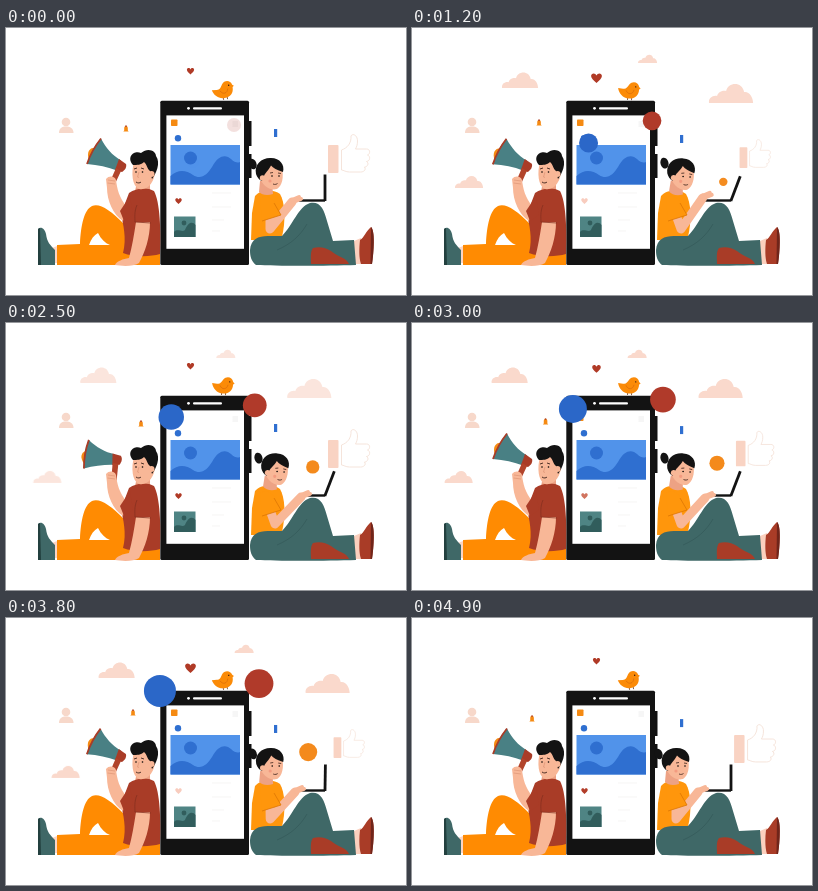
An HTML page for the animation above (5000 ms loop, 400 by 267 pixels).

```html
<!DOCTYPE html>
<html lang="en">
<head>
<meta charset="utf-8">
<title>Social phone</title>
<style>
html, body { margin: 0; width: 100%; height: 100%; overflow: hidden; background: #fff; }
svg { display: block; width: 100vw; height: 100vh; }
</style>
</head>
<body>
<svg viewBox="0 0 400 267" preserveAspectRatio="none">
  <defs>
    <path id="cloud" d="M0 20C-1 15 4 12 8 13C9 8 15 7 17 8C19-1 33-2 35 9C40 8 44 14 44 20Z"/>
    <path id="heartShape" d="M0 4.5C-3 2-5-.2-5-2C-5-5-1-5.2 0-2.5C1-5.2 5-5 5-2C5-.2 3 2 0 4.5Z"/>
  </defs>
  <rect width="400" height="267" fill="#fff"/>

  <g id="clouds" fill="#fad9cc"></g>

  <g fill="#f7d8ca">
    <circle cx="60" cy="94" r="4.3"/>
    <path d="M53 105C53 100 56 98.5 60 98.5S67.5 100 67.5 105Z"/>
  </g>
  <g id="bell" fill="#f58a12">
    <path d="M-1.8 1.5V-1C-1.8-3.8 1.8-3.8 1.8-1V1.5L2.7 2.6H-2.7Z"/>
    <circle cy="-2.8" r=".9" fill="#b5472a"/>
  </g>
  <rect id="chip" x="268" width="3.2" height="8" fill="#2f6fd0"/>
  <use id="heart" href="#heartShape" fill="#b03a26"/>

  <g id="thumb">
    <rect x="-21.5" y="-9" width="10.5" height="28" rx="1" fill="#f9d3c3"/>
    <path d="M-8-4C-2-6 2-11 1.5-18C3-21 8-19 8-13C8-9 7-7 6-5H17C21-5 21 0 18 1C21 2 21 7 17 7.5C20 9 18 13 15 13C17 16 14 18 11 18H0C-4 18-6 16-8 16Z" fill="#fff" stroke="#f3ddd2" stroke-width=".8"/>
  </g>

  <!-- phone -->
  <path d="M243 93h2.5v25H243zM243 126h2.5v24H243z" fill="#111"/>
  <rect x="154.3" y="72.7" width="88.7" height="164.3" rx="1.5" fill="#131313"/>
  <rect x="160.4" y="87.4" width="77.6" height="133.4" fill="#fff"/>
  <circle cx="182.5" cy="80.3" r="1.4" fill="#fff"/>
  <rect x="187" y="79.2" width="29" height="2.3" rx="1.1" fill="#fff"/>
  <rect x="165" y="91.5" width="6.5" height="6.5" rx=".8" fill="#f58a12"/>
  <path d="M226.5 94h5.5M226.5 96h5.5M226.5 98h5.5" stroke="#e6e6e6" stroke-width=".7"/>
  <circle cx="172" cy="110.3" r="3.2" fill="#2f6fd0"/>
  <rect x="164.5" y="117" width="69.5" height="39.5" fill="#5193ea"/>
  <circle cx="184.5" cy="130" r="6.5" fill="#2f6fd0"/>
  <path d="M164.5 148C172 141 180 142 187 147C195 152 201 147 206 139C212 127 220 126 225 131C229 135 232 135 234 134V156.5H164.5Z" fill="#2f6fd0"/>
  <use id="like" href="#heartShape" transform="translate(172.5 173) scale(.65)"/>
  <path d="M206 165h19M206 179h19M206 192h12M206 203h8" stroke="#f3f1f0" stroke-width=".7"/>
  <rect x="168" y="188.5" width="21.5" height="20.5" fill="#4f8484"/>
  <circle cx="178" cy="195" r="2.4" fill="#315d5c"/>
  <path d="M168 204C172 200 176 205 179 202C183 193 187 194 189.5 197V209H168Z" fill="#315d5c"/>

  <g id="bird">
    <path d="M0 6V9.5M4 6V9.5" stroke="#70412a" stroke-width=".8"/>
    <path d="M-10-2L-5-1.5C-2-1-1-3 1-6C4-10 10-9 11-4L12.5-2.5L11-1.5C11 5 7 8 1.500 8C-5 8-9 3-10-2Z" fill="#fb8b08"/>
    <path d="M-2 0C0 4.5 5 4 6-1" fill="none" stroke="#d96d0c" stroke-width=".7"/>
    <circle cx="7.5" cy="-4" r=".7" fill="#3b1c10"/>
  </g>

  <!-- man -->
  <path d="M51 217L74 216C75 197 78 182 86 178C94 175 104 182 118 196L126 220H154V237H51Z" fill="#ff8b02"/>
  <path d="M83 217C85 211 88 207 92 205C95 211 99 215 104 217Z" fill="#fff"/>
  <path d="M46 220L51 218V235H46Z" fill="#fbd5c5"/>
  <path d="M32 201C35 198 39 201 40 206C41 214 44 217 49 222V237H33C32 226 32 214 32 201Z" fill="#3f6867"/>
  <path d="M32 201L34 200L35 237H32Z" fill="#23403f"/>
  <path d="M131 154H144V168H128Z" fill="#eda284"/>
  <path d="M123 165C130 160 141 159 148 163C154 174 155 202 154 226C144 229 127 229 117 225C121 210 117 196 115 186Z" fill="#a93c27"/>
  <g id="horn">
    <path d="M83 132C80 124 84 119 90 120L88 132Z" fill="#f58a12"/>
    <path d="M95 110.500C100 120 106 127 115 132.500L111 142.500C102 139 92 137 81 136C84 127 88 118 95 110.500Z" fill="#498084"/>
    <path d="M95 110.500C89 118 84 127 81 136" fill="none" stroke="#a93c27" stroke-width="1.8"/>
    <path d="M113 131L120 136C121 139 119 142 116 144L109 142Z" fill="#a93c27"/>
    <path d="M110 140L115 143L108 158L103 156Z" fill="#b2442b"/>
  </g>
  <path d="M100 151C103 147 109 148 110 152C111 160 113 170 121 179L117 193C107 187 101 172 101 160Z" fill="#f8b797"/>
  <path d="M124 168L127 187L118 193L114 183Z" fill="#a93c27"/>
  <path d="M102 152L109 153M101.5 155L109 156" stroke="#df9576" stroke-width=".7"/>
  <path d="M144 194C144 210 139 224 133 235C127 239 115 238 109 237C111 233 117 231 123 230C126 219 128 207 130 194Z" fill="#f8b797"/>
  <path d="M131 177C128 184 129 190 129 194L145 195" fill="none" stroke="#873020" stroke-width=".8"/>
  <g transform="translate(3 0)">
    <path d="M125 134C122 145 123 158 130 161C139 163 146 153 146 143L142 131Z" fill="#f8b797"/>
    <path d="M124 137C117 129 125 122 132 125C139 119 147 123 147 128C152 135 147 146 143 151L141 143C138 141 138 136 135 134C132 137 128 137 124 137Z" fill="#131313"/>
    <circle cx="142.5" cy="146" r="3" fill="#f8b797"/>
    <path d="M125 141L128 140M132 140L135 141M127 154C129 155.5 131 155 132 154" fill="none" stroke="#3b211a" stroke-width=".9"/>
    <circle cx="127" cy="144" r=".8"/><circle cx="133.5" cy="144" r=".8"/>
    <path d="M130 144L128.5 149L130 149.5" fill="none" stroke="#dd9476" stroke-width=".7"/>
  </g>

  <!-- woman -->
  <path d="M249 168C255 161 268 161 274 166C279 174 280 192 276 209L268 212H245L246 185Z" fill="#ff960c"/>
  <path d="M348 213L355 210V236H348Z" fill="#fbd0be"/>
  <path d="M244 222C245 211 252 208 262 208L276 208C287 197 292 179 304 175C314 173 318 181 321 193L327 213L348 212L350 237C320 238 270 238 250 237C245 233 244 228 244 222Z" fill="#3f6867"/>
  <path d="M301 196C294 208 285 216 271 222" fill="none" stroke="#345a59" stroke-width=".7"/>
  <path d="M307 220C314 218 320 220 325 223C332 229 341 230 343 236H305C305 230 304 224 307 220Z" fill="#a93c27"/>
  <path d="M354 212C358 210 360 203 365 199C369 202 368 223 366 236H355C353 230 353 221 354 212Z" fill="#a93c27"/>
  <path d="M365 199C369 202 368 223 366 236H364.500Z" fill="#70251a"/>
  <path d="M293 172.5H319" stroke="#131313" stroke-width="2.4"/>
  <path id="screen" d="M319 173V146.5" stroke="#131313" stroke-width="2.8"/>
  <path id="arm" fill="none" stroke="#f8b797" stroke-width="9" stroke-linecap="round" stroke-linejoin="round"/>
  <path id="fingers" fill="none" stroke="#f8b797" stroke-width="4" stroke-linecap="round"/>
  <path d="M254 171C258 166 267 169 270 177L275 187L256 193Z" fill="#ff960c"/>
  <path d="M268 175L275 187L256 193" fill="none" stroke="#dd7704" stroke-width=".8"/>
  <g id="face">
    <path d="M254 153H266L267 166C261 168 256 167 253 164Z" fill="#eda284"/>
    <ellipse cx="246.500" cy="136" rx="4" ry="5.5" transform="rotate(-20 246.500 136)" fill="#131313"/>
    <path d="M254 140C258 133 272 133 276 141C278 149 276 158 271 161C263 163 256 157 253 148Z" fill="#f8b797"/>
    <path d="M250 146C248 136 256 129.500 265 130C274 130 279 137 277 144C271 142 267 140 265 137.500C263 142 259 145 258 148L256 153C253 152 251 149 250 146Z" fill="#131313"/>
    <circle cx="256.500" cy="150" r="2.7" fill="#f8b797"/>
    <path d="M264 145L267 144.5M272 145L275 145.5M267 156C269 157 271 156 271.5 155.5" fill="none" stroke="#3b211a" stroke-width=".8"/>
    <circle cx="266" cy="148" r=".8"/><circle cx="273" cy="148" r=".8"/>
    <circle cx="264" cy="153" r="1.6" fill="#f39b80"/>
  </g>

  <circle id="blue" fill="#2b67c8"/>
  <circle id="red" fill="#b03a2a"/>
  <circle id="orange" fill="#f48a1c"/>
</svg>
<script>
const LOOP = 5000, HALF = 2500, DRIFT = 2450;
const $ = id => document.getElementById(id);
const clamp = v => Math.max(0, Math.min(1, v));
const smooth = v => { v = clamp(v); return v * v * (3 - 2 * v); };
const ramp = (t, a, b) => smooth((t - a) / (b - a));
const wave = (t, period) => (1 - Math.cos(2 * Math.PI * t / period)) / 2;
const mix = (a, b, k) => a + (b - a) * k;
const set = (el, attrs) => { for (const k in attrs) el.setAttribute(k, attrs[k]); };

// left edge, bottom edge, width
const clouds = [[74, 60, 36], [281, 75, 44], [210, 35, 19], [27, 160, 28]].map(([x, y, w]) => {
  const el = document.createElementNS('http://www.w3.org/2000/svg', 'use');
  set(el, { href: '#cloud' });
  $('clouds').append(el);
  return { el, x, y, s: w / 44 };
});

// time, x, y
const handPath = [[0, 291, 170], [700, 294, 165], [1800, 298, 167], [2500, 300, 170],
  [3000, 298, 171], [3800, 294, 170], [5000, 291, 170]];

function handAt(t) {
  const i = handPath.findIndex(p => p[0] > t);
  const a = handPath[i - 1], b = handPath[i], k = ramp(t, a[0], b[0]);
  return [mix(a[1], b[1], k), mix(a[2], b[2], k)];
}

function bubble(id, cx, cy, r, opacity) {
  set($(id), { cx, cy, r, opacity });
}

function draw(t) {
  const s = t / 1000;
  const beat = wave(t, HALF);
  const pulse = smooth(wave(t, DRIFT));
  const back = 1 - ramp(t, 3100, 3900);
  const pose = ramp(t, 100, 800) * back;
  const tilt = ramp(t, 200, 1250) * back;
  const leave = 1 - ramp(t, 4300, 4850);

  const phase = t % DRIFT;
  const shift = 33 * mix(phase / DRIFT, wave(phase, 2 * DRIFT), .5);
  for (const c of clouds)
    set(c.el, { transform: `translate(${c.x + shift} ${c.y - 20 * c.s}) scale(${c.s})` });
  const fadeIn = t < DRIFT ? ramp(t, 0, 400) : clamp(.5 + phase / 300);
  set($('clouds'), { opacity: fadeIn * (1 - ramp(phase, 1300, 2350)) * leave });

  set($('bell'), { transform: `translate(${mix(120, 135, wave(t, LOOP))} ${101 - 6 * beat})` });
  set($('chip'), { y: 101 + 6 * beat });
  set($('heart'), { transform: `translate(184.5 ${43.2 + 7 * pulse}) scale(${mix(.72, 1.08, pulse)})` });
  set($('like'), { opacity: 1 - .65 * beat, fill: `rgb(${mix(176, 235, beat)},${mix(58, 110, beat)},${mix(38, 70, beat)})` });
  set($('thumb'), { transform: `translate(343.5 126) scale(${mix(1, .74, beat)})` });

  set($('bird'), { transform: `translate(216 62.5) rotate(${mix(-10, 3, pose)})` });
  set($('horn'), { transform: `rotate(${-19 * ramp(wave(t, 1000), .3, .7)} 108 150)` });
  set($('screen'), { transform: `rotate(${21 * tilt} 319 172.5)` });
  set($('face'), { transform: `translate(${4 * pose} 0) rotate(${4 * pose} 260 164)` });

  const [hx, hy] = handAt(t);
  const elbow = mix(264, 269, pose);
  set($('arm'), { d: `M264 187L${elbow} 201L${hx - 5} ${hy + 4}` });
  set($('fingers'), { d: `M${hx - 5} ${hy + 2}L${hx + 2} ${hy - 1}M${hx - 4} ${hy + 4}L${hx + 4} ${hy + 1}` });

  const show = clamp((t + 70) / 450) * leave;
  bubble('blue', 187 - 8.7 * s, 134.5 - 16.2 * s, 6.5 + 2.5 * s, clamp(t / 450) * leave);
  bubble('red', 228 + 11.6 * s - 1.32 * s * s, 97 - 1.3 * s - 1.83 * s * s, 7 + 1.95 * s, show);
  bubble('orange', 315.5 - 3.5 * s, 163 - 7.6 * s, 2 + 1.85 * s, ramp(t, 150, 1300) * leave);
}

function tick() {
  draw(performance.now() % LOOP);
  requestAnimationFrame(tick);
}
tick();
</script>
</body>
</html>
```
